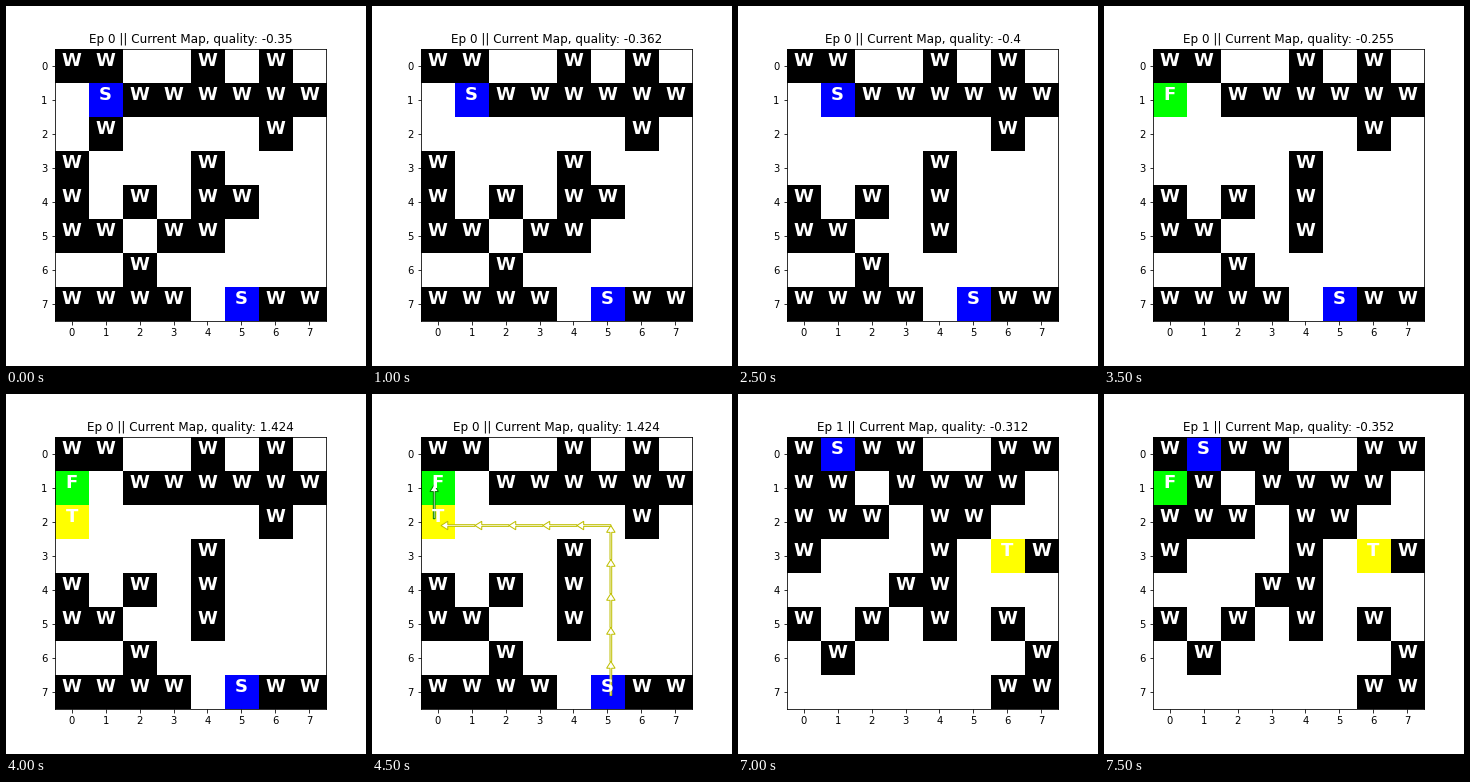
Recreate the animation shown at these times as a matplotlib script. Size 360 px wide and 360 px high, loop 8 s.

```python
import matplotlib.pyplot as plt
import numpy as np
from matplotlib.animation import FuncAnimation

STEP = 500
LOOP = 8000
COLORS = {".": (255, 255, 255), "W": (0, 0, 0), "S": (0, 0, 255),
          "F": (0, 255, 0), "T": (255, 255, 0)}

MAPS = [
    "WW..W.W. .SWWWWWW .W....W. W...W... W.W.WW.. WW.WW... ..W..... WWWW.SWW",
    "W.WW..WW WW.WWWW. WWW.WW.. W...W.TW ...WW... W.W.W.W. .W.....W ......WW",
]

# (time, episode, quality, edited cell as (row, col, tile))
EDITS = [
    (0, 0, "-0.35", None),
    (1000, 0, "-0.362", (2, 1, ".")),
    (1500, 0, "-0.375", (4, 5, ".")),
    (2000, 0, "-0.388", (3, 0, ".")),
    (2500, 0, "-0.4", (5, 3, ".")),
    (3000, 0, "-0.412", (1, 1, ".")),
    (3500, 0, "-0.255", (1, 0, "F")),
    (4000, 0, "1.424", (2, 0, "T")),
    (6000, 1, "-0.271", None),
    (7000, 1, "-0.312", (0, 1, "S")),
    (7500, 1, "-0.352", (1, 0, "F")),
]

# Routes as (row, col) corners, with a shift that keeps them apart
ROUTES = [
    ([(7, 5), (2, 5), (2, 0)], 0.1, "y"),
    ([(2, 0), (1, 0)], -0.1, "g"),
]
ROUTE_TIME = (4500, 6000)

plt.rcParams["font.family"] = "DejaVu Sans"
fig = plt.figure(figsize=(5, 5), dpi=72, facecolor="white")
fig.subplots_adjust(left=0.125, right=0.9, bottom=0.125, top=0.88)
ax = fig.add_subplot()


def state_at(t):
    grid, title = None, ""
    for start, episode, quality, edit in EDITS:
        if start > t:
            break
        if edit is None:
            grid = [list(row) for row in MAPS[episode].split()]
        else:
            row, col, tile = edit
            grid[row][col] = tile
        title = f"Ep {episode} || Current Map, quality: {quality}"
    return grid, title


def draw_route(corners, shift, color):
    for (r0, c0), (r1, c1) in zip(corners, corners[1:]):
        dr, dc = np.sign(r1 - r0), np.sign(c1 - c0)
        for i in range(abs(r1 - r0) + abs(c1 - c0)):
            ax.arrow(c0 + dc * i + shift, r0 + dr * i + shift, dc, dr,
                     width=0.05, head_width=0.25, head_length=0.2,
                     length_includes_head=True, fc="white", ec=color)


def draw(frame):
    t = frame * STEP
    grid, title = state_at(t)
    ax.clear()
    ax.imshow(np.array([[COLORS[c] for c in row] for row in grid], np.uint8),
              interpolation="nearest")
    for r, row in enumerate(grid):
        for c, tile in enumerate(row):
            if tile != ".":
                ax.text(c, r, tile, color="white", size=18, weight="bold",
                        ha="center")
    if ROUTE_TIME[0] <= t < ROUTE_TIME[1]:
        for route in ROUTES:
            draw_route(*route)
    ax.set_xticks(range(8))
    ax.set_yticks(range(8))
    ax.set_xlim(-0.5, 7.5)
    ax.set_ylim(7.5, -0.5)
    ax.set_title(title)
    return ax.get_children()


anim = FuncAnimation(fig, draw, frames=LOOP // STEP, interval=STEP,
                     init_func=lambda: draw(0), repeat=True, repeat_delay=0)
plt.show()
```
